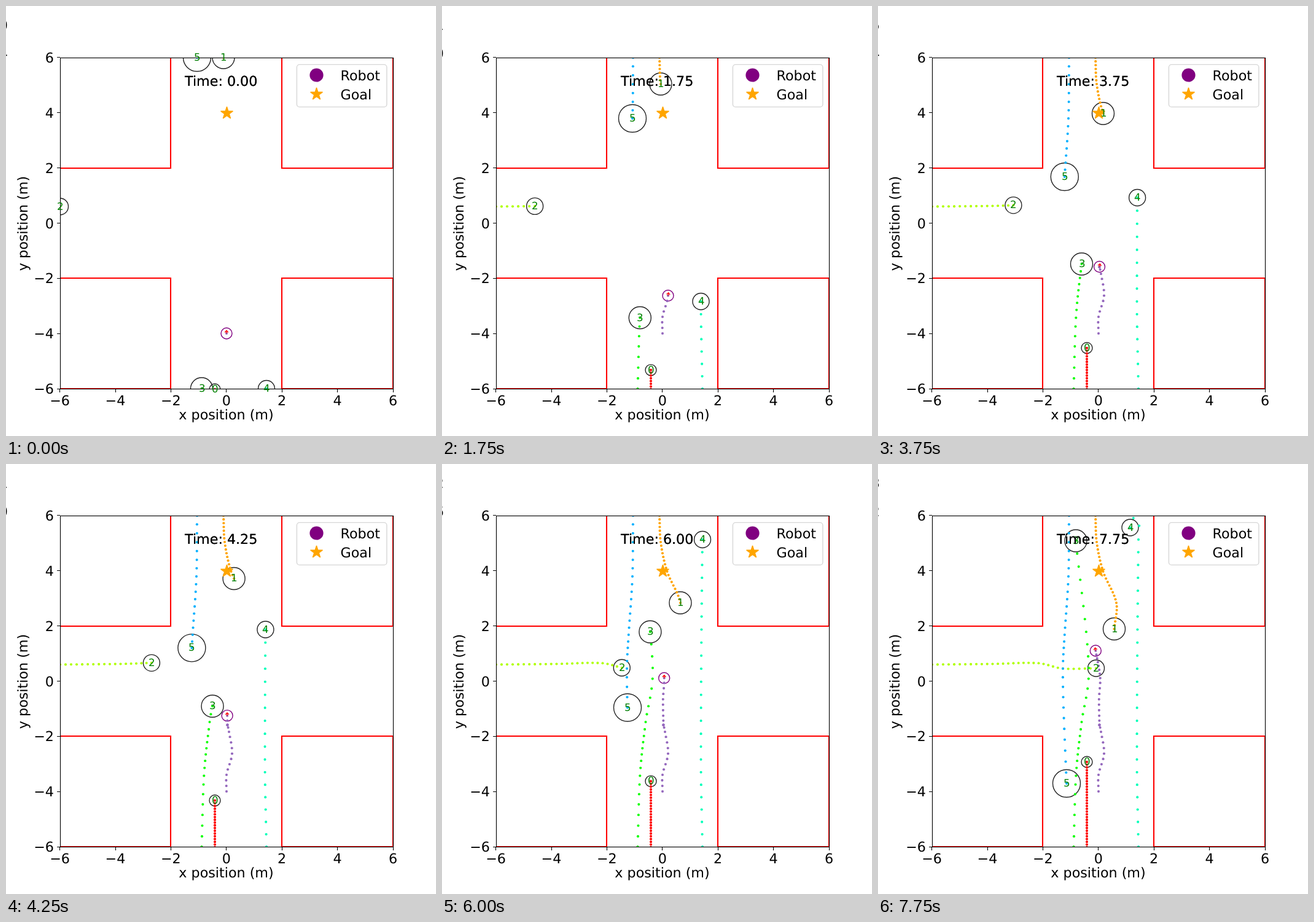
An HTML page for the animation above (8000 ms loop, 700 by 700 pixels).

```html
<!DOCTYPE html>
<html lang="en">
<head>
<meta charset="utf-8">
<title>Robot crossing</title>
<style>
  html, body { margin: 0; width: 100%; height: 100%; overflow: hidden; background: #fff; }
  svg { display: block; width: 700px; height: 700px; }
  text { font: 22.22px "DejaVu Sans", sans-serif; text-rendering: geometricPrecision; white-space: pre; }
  .mid { text-anchor: middle; }
  .end { text-anchor: end; }
  .id { font-size: 16.67px; fill: #008000; }
</style>
</head>
<body>
<svg viewBox="0 0 700 700">
  <clipPath id="area"><rect x="88" y="84" width="542.5" height="539.5"/></clipPath>
  <g clip-path="url(#area)">
    <g id="bodies" fill="none" stroke-width="1.39"></g>
    <path fill="none" stroke="#f00" stroke-width="2.08"
      d="M88 264H268V84M630 84V264H449V84M88 443H268V623H88M630 443H449V623H630Z"/>
    <g id="trails"></g>
    <path id="arrow" fill="none" stroke="#f00" stroke-width="1.3" d="M0 0V-4.5M-2.8 -1.8L0 -4.8L2.8 -1.8"/>
  </g>
  <g id="axes" fill="none" stroke="#000" stroke-width="1.11">
    <rect x="88.5" y="84.5" width="542" height="539"/>
  </g>
  <g id="labels">
    <text class="mid" x="358.5" y="673">x position (m)</text>
    <text class="mid" transform="translate(35 354) rotate(-90)">y position (m)</text>
    <text id="top" class="end" x="3" y="39"></text>
    <text id="low" class="end" x="3" y="85"></text>
  </g>
  <g id="ids"></g>
  <text class="time" x="291" y="130"></text>
  <text class="time" x="291" y="130"></text>
  <g id="legend">
    <rect x="473.4" y="95.4" width="146.5" height="69" rx="4.4" fill="#fff" fill-opacity=".8" stroke="#ccc" stroke-opacity=".8" stroke-width="1.39"/>
    <circle cx="505.5" cy="112.5" r="11.1" fill="#800080"/>
    <text x="544.5" y="121">Robot</text>
    <text x="544.5" y="152">Goal</text>
  </g>
</svg>
<script>
const STEP = 250, STEPS = 32;
const $ = id => document.getElementById(id);

function add(parent, tag, attrs, text) {
  const el = document.createElementNS('http://www.w3.org/2000/svg', tag);
  set(el, attrs);
  if (text !== undefined) el.textContent = text;
  return $(parent).appendChild(el);
}

function set(el, attrs) {
  for (const k in attrs) el.setAttribute(k, attrs[k]);
}

function star(parent, cx, cy) {
  const points = Array.from({ length: 10 }, (_, i) => {
    const r = i % 2 ? 3.98 : 10.42, a = i * Math.PI / 5;
    return [cx + r * Math.sin(a), cy - r * Math.cos(a)];
  }).join(' ');
  add(parent, 'polygon', { points, fill: '#ffa500', stroke: '#ffa500', 'stroke-width': 1.39, 'stroke-linejoin': 'bevel' });
}

// Axis ticks
for (let m = -6; m <= 6; m += 2) {
  const x = 358.75 + m * 45.2, y = 353.5 - m * 44.92;
  const px = Math.round(x - .3) + .5, py = Math.floor(y + .01) + .5;
  const name = String(m).replace('-', '\u2212');
  add('axes', 'path', { d: `M${px} 624v4.9M88 ${py}h-4.9` });
  add('labels', 'text', { class: 'mid', x, y: 650 }, name);
  add('labels', 'text', { class: 'end', x: 78, y: Math.round(y + 8) }, name);
}

// Smooth curve through [step, x, y] keys, c = 1 for x and 2 for y
function smooth(keys, s, c) {
  const i = Math.max(1, keys.findIndex(k => k[0] >= s));
  const slope = j => {
    const a = keys[Math.max(0, j - 1)], b = keys[Math.min(keys.length - 1, j + 1)];
    return (b[c] - a[c]) / (b[0] - a[0]);
  };
  const a = keys[i - 1], b = keys[i], h = b[0] - a[0], t = (s - a[0]) / h;
  return a[c] + (b[c] - a[c]) * t * t * (3 - 2 * t)
    + h * t * (1 - t) * (slope(i - 1) * (1 - t) - slope(i) * t);
}

const agents = [];

function agent(id, color, r, keys, stroke = '#222') {
  const path = Array.from({ length: STEPS }, (_, s) => [smooth(keys, s, 1), smooth(keys, s, 2)]);
  agents.push({
    path,
    body: add('bodies', 'circle', { r, stroke }),
    dots: path.map(([cx, cy]) => add('trails', 'circle', { cx, cy, r: 2.05, fill: color })),
    tag: add('ids', 'text', { class: 'id' }, id)
  });
}

agent('', '#9467bd', 9, [
  [0, 359, 533], [3, 359, 506], [7, 368, 471.5], [11, 363, 436], [13, 360.5, 424.5],
  [15, 360.5, 424.5], [20, 359.8, 383], [24, 361.7, 348.5], [31, 354.3, 304]], '#800080');
agent('0', '#f00', 9, [[0, 340, 624], [31, 340, 485]]);
agent('1', '#ffa500', 18, [[0, 354, 84], [7, 356, 127], [15, 366.5, 175], [24, 388, 226], [31, 384.5, 268.5]]);
agent('2', '#b0ff00', 13.5, [[0, 88, 326.5], [11, 186.5, 325.5], [20, 261.5, 324.3], [25, 301, 333], [31, 355, 332.5]]);
agent('3', '#0cff00', 18, [[0, 318.5, 623], [7, 322.3, 507.5], [15, 331.5, 420], [21, 343, 332], [31, 322, 125]]);
agent('4', '#00ffb9', 13.5, [[0, 424, 623], [7, 421.5, 481], [24, 424, 123], [27.5, 427, 60], [31, 410.5, 103.5]]);
agent('5', '#00b0ff', 22.5, [
  [0, 311, 84], [7, 310, 183], [15, 303.8, 278], [20, 301, 333], [24, 302, 396.5], [31, 307, 520]]);

star('trails', 359.5, 174.5);
star('legend', 505.5, 143.5);

function draw(step) {
  for (const { path, body, dots, tag } of agents) {
    const [x, y] = path[step];
    set(body, { cx: x, cy: y });
    set(tag, { x: Math.round(x - 5), y: Math.round(y + 5) });
    dots.forEach((dot, i) => { dot.style.display = i > step ? 'none' : ''; });
  }
  const { path } = agents[0], [x, y] = path[step], [px, py] = path[Math.max(0, step - 1)];
  const turn = Math.atan2(x - px, py - y) * 180 / Math.PI;
  set($('arrow'), { transform: `translate(${x} ${y}) rotate(${turn})` });
  for (const el of document.querySelectorAll('.time')) {
    el.textContent = 'Time: ' + (step * STEP / 1000).toFixed(2);
  }
  // Last digits of two readouts cut off by the left edge
  $('top').textContent = step * 3 % 10;
  $('low').textContent = (4 + step * 8) % 10;
}

const start = performance.now();
let shown = -1;
function tick() {
  const step = Math.floor((performance.now() - start) / STEP) % STEPS;
  if (step !== shown) draw(shown = step);
  requestAnimationFrame(tick);
}
tick();
</script>
</body>
</html>
```
